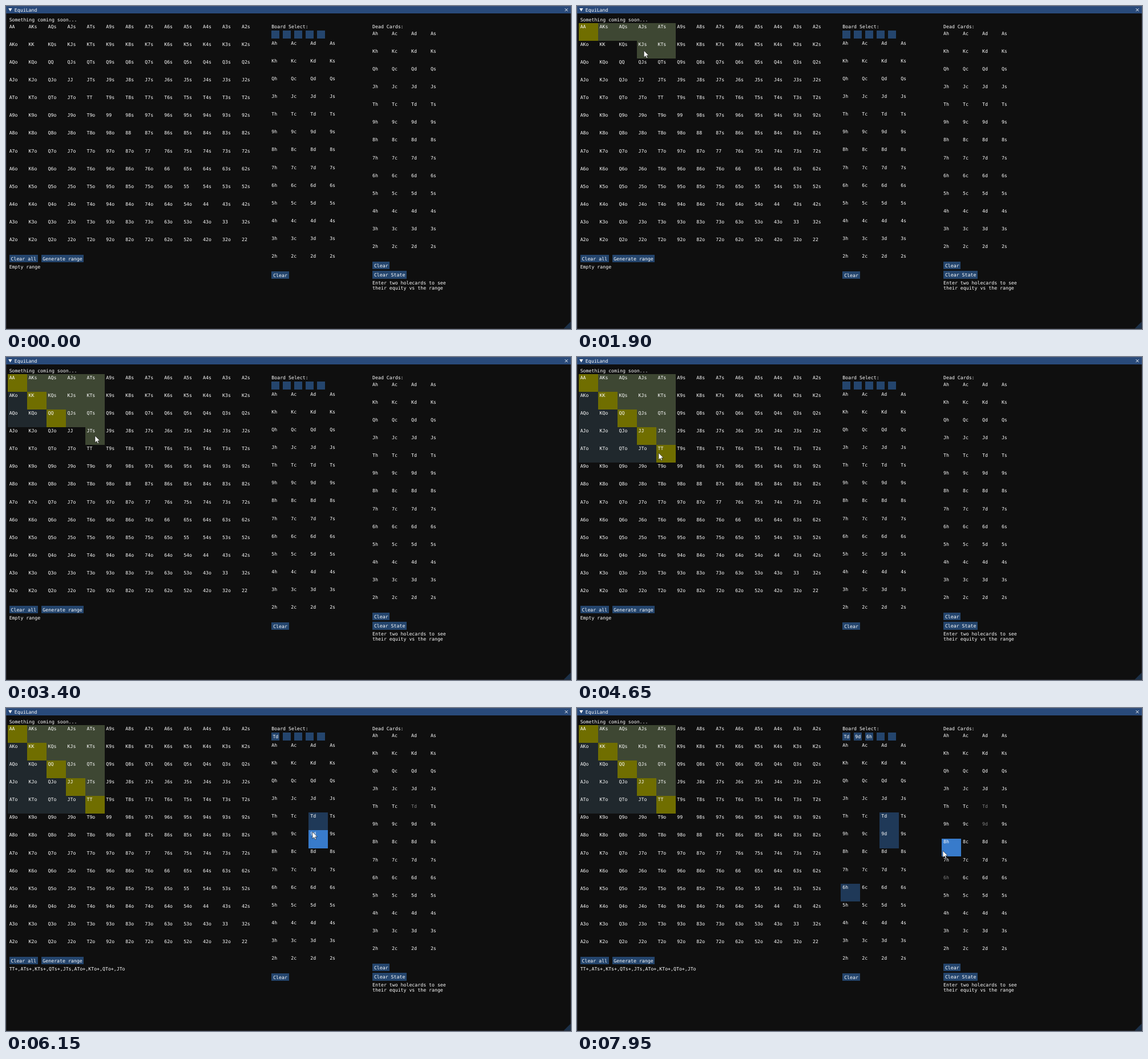
These frames come from a looping animation (990x566 px, 8000 ms). An HTML page:

```html
<!DOCTYPE html>
<html lang="en">
<head>
<meta charset="utf-8">
<title>EquiLand</title>
<style>
html, body { margin: 0; width: 100%; height: 100%; overflow: hidden; background: #0f0f0f; }
svg { display: block; width: 100%; height: 100%; }
rect { shape-rendering: crispEdges; }
text { font: 11.63px "DejaVu Sans Mono", monospace; fill: #fff; text-rendering: geometricPrecision; }
</style>
</head>
<body>
<svg id="ui" viewBox="0 0 1400 800" preserveAspectRatio="none"></svg>
<script>
const ui = document.getElementById('ui');
const SCALE = 990 / 1400;       // stage pixels per interface unit
const STEP = 50, LOOP = 8000;
const CELL_W = 48, CELL_H = 44, CHAR = 7, LINE = 13;
const BUTTON = '#24456d', HOVER = '#387bcb', ACTIVE = '#4296fa', SELECTED = '#1f3958';
const PAIR = '#706e00', SUITED = '#3e4733', OFFSUIT = '#20282d';
const RANKS = [...'AKQJT98765432'];
const RANGE = 'TT+,ATs+,KTs+,QTs+,JTs,ATo+,KTo+,QTo+,JTo';

const APPEAR = 500, PRESS = 700, RELEASE = 4900, GENERATE = 5300;
const PICKS = [[5800, 'Td'], [6350, '9d'], [7150, '6h']];

// Pointer moves: start, end, x, y in stage pixels.
// The drag zigzags: step down to the next row, then sweep across it.
const HOME = [18, 48], ROW = 30, DROP = 150;
const SWEEPS = [[550, 1400, 152], [1550, 2300, 18], [2400, 3200, 156], [3250, 4000, 18], [4100, 4600, 143]];
const MOVES = SWEEPS.flatMap(([from, to, x], i) => {
  const y = HOME[1] + i * ROW, edge = i ? SWEEPS[i - 1][2] : HOME[0];
  return [[from, from + DROP, edge, y], [from + DROP, to, x, y]];
}).concat([
  [4900, 5150, 98, 440],
  [5350, 5700, 544, 197],
  [5850, 6100, 537, 217],
  [6400, 6900, 471, 318],
  [7200, 7900, 641, 250]
]);

function add(tag, attrs) {
  const el = document.createElementNS('http://www.w3.org/2000/svg', tag);
  for (const k in attrs) el.setAttribute(k, attrs[k]);
  return ui.appendChild(el);
}

const box = (x, y, width, height, fill) => add('rect', { x, y, width, height, fill });
const paint = (el, fill) => el.setAttribute('fill', fill);

function label(x, y, str) {
  const el = add('text', { x, y: y + 10.7 });
  el.textContent = str;
  return el;
}

const inside = (a, [x, y]) => x >= a.x && x < a.x + a.w && y >= a.y && y < a.y + a.h;

function button(x, y, str) {
  const w = str.length * CHAR + 8, h = LINE + 6;
  const rect = box(x, y, w, h, BUTTON);
  label(x + 4, y + 3, str);
  return { x, y, w, h, rect };
}

function cell(left, top, col, row, name, color) {
  const x = left + col * CELL_W - 4, y = top + row * CELL_H - 2;
  const rect = box(x, y, CELL_W, CELL_H, 'none');
  return { x, y, w: CELL_W, h: CELL_H, rect, text: label(x + 4, y + 2, name), name, color };
}

const cards = (x, y) =>
  RANKS.flatMap((r, row) => [...'hcds'].map((s, col) => cell(x, y, col, row, r + s)));

// Window frame
box(0, 0, 1400, 19, '#294a7a');
add('path', { d: 'M10.5 13.4L6 5.6H15Z', fill: '#fff' });
label(21, 3, 'EquiLand');
add('path', { d: 'M1385 6l7 7m0-7l-7 7', stroke: '#fff', 'stroke-width': 1.3 });
add('path', { d: 'M1399 782V799H1382Z', fill: '#1c314a' });
add('path', { d: 'M.5 .5H1399.5V799.5H.5Z', fill: 'none', stroke: 'rgba(110,110,128,.5)' });

// Range grid
label(8, 27, 'Something coming soon...');
const hands = RANKS.flatMap((a, row) => RANKS.map((b, col) => {
  const [name, color] = row === col ? [a + b, PAIR]
    : col > row ? [a + b + 's', SUITED] : [b + a + 'o', OFFSUIT];
  return cell(8, 44, col, row, name, color);
}));
button(8, 616, 'Clear all');
const generate = button(87, 616, 'Generate range');
const summary = label(8, 639, '');

// Board and dead cards
label(658, 44, 'Board Select:');
const slots = Array.from({ length: 5 }, (_, i) => {
  box(658 + i * 28, 61, 20, 20, BUTTON);
  return label(661 + i * 28, 64.5, '');
});
const board = cards(658, 85);
button(658, 657, 'Clear');
label(908, 44, 'Dead Cards:');
const dead = cards(908, 61);
button(908, 633, 'Clear');
button(908, 656, 'Clear State');
label(908, 679, 'Enter two holecards to see');
label(908, 679 + LINE, 'their equity vs the range');

const pointer = add('path', {
  d: 'M0 0V17L4 13.2L6.7 19L9.3 18L6.8 12.3H12Z', fill: '#fff', stroke: '#000', 'stroke-width': .8
});

function pointerAt(t) {
  let [x, y] = HOME;
  for (const [from, to, nx, ny] of MOVES) {
    const k = Math.min(1, Math.max(0, (t - from) / (to - from)));
    const ease = k * k * (3 - 2 * k);
    x += (nx - x) * ease;
    y += (ny - y) * ease;
  }
  return [x / SCALE, y / SCALE];
}

function paintedHands(t) {
  const set = new Set();
  for (let u = PRESS; u < Math.min(t, RELEASE); u += STEP) {
    const p = pointerAt(u);
    set.add(hands.find(c => inside(c, p)));
  }
  return set;
}

function draw(t) {
  const shown = t >= APPEAR;
  pointer.setAttribute('transform', `translate(${pointerAt(t)})`);
  pointer.setAttribute('visibility', shown ? 'visible' : 'hidden');

  // Highlights trail the pointer by one step
  const spot = shown ? pointerAt(t - STEP) : [-99, -99];
  const drag = t >= PRESS && t < RELEASE;
  const painted = paintedHands(t);
  const picked = PICKS.filter(p => t >= p[0]).map(p => p[1]);

  // While dragging, only the cell where the press began lights up
  hands.forEach((c, i) => {
    const lit = inside(c, spot) && (!drag || i === 0);
    paint(c.rect, lit ? (drag ? ACTIVE : HOVER) : painted.has(c) ? c.color : 'none');
  });
  for (const c of board) {
    paint(c.rect, inside(c, spot) ? HOVER : picked.includes(c.name) ? SELECTED : 'none');
  }
  for (const c of dead) {
    const off = picked.includes(c.name);
    paint(c.rect, inside(c, spot) && !off ? HOVER : 'none');
    c.text.style.fill = off ? '#808080' : '#fff';
  }
  slots.forEach((s, i) => s.textContent = picked[i] || '');
  paint(generate.rect, inside(generate, spot) ? ACTIVE : BUTTON);
  summary.textContent = t < GENERATE ? 'Empty range' : RANGE;
}

let start, last;
function frame(now) {
  start ??= now;
  const t = Math.floor((now - start) % LOOP / STEP) * STEP;
  if (t !== last) draw(last = t);
  requestAnimationFrame(frame);
}
draw(0);
requestAnimationFrame(frame);
</script>
</body>
</html>
```
